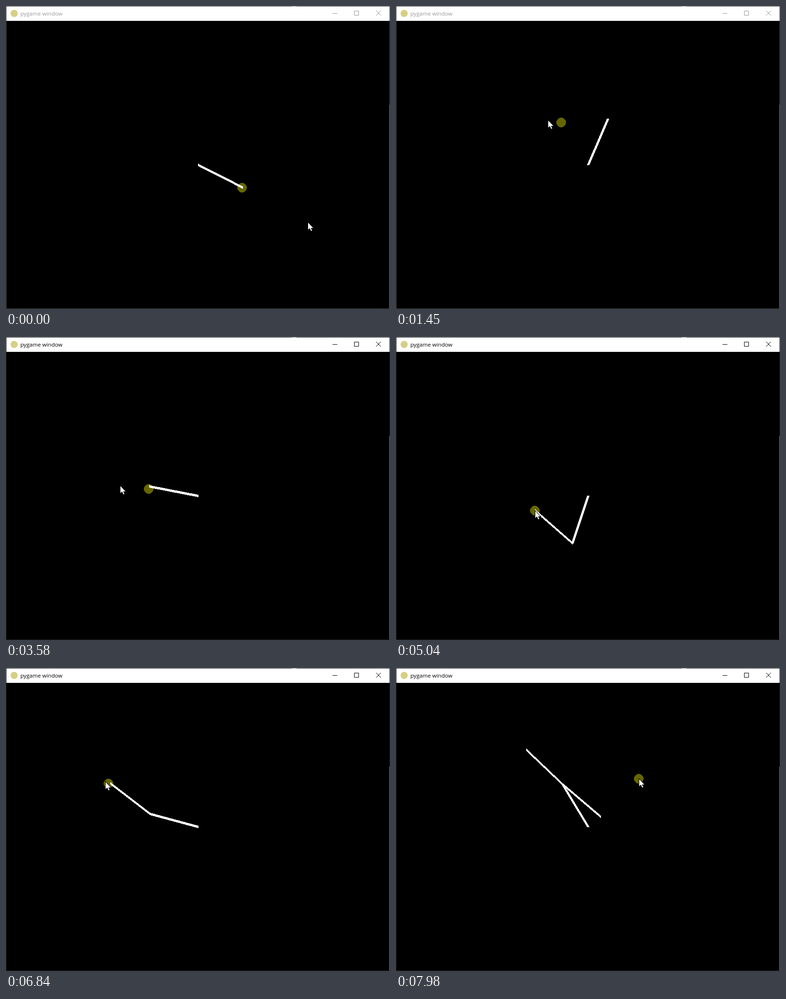
Write an HTML page that moves like this. It is 802 px wide and 632 px high and loops after 8000 ms.

```html
<!DOCTYPE html>
<html lang="en">
<head>
<meta charset="utf-8">
<title>Arm following the pointer</title>
<style>
  html, body { margin: 0; width: 100%; height: 100%; overflow: hidden; background: #000; }
  svg { display: block; width: 802px; height: 632px; color: #999; --edge: #484848; }
  svg.active { color: #000; --edge: #222; }
  .edge { fill: var(--edge); }
  .title { font: 11.6px "Open Sans", "Noto Sans", sans-serif; fill: currentColor; }
  .buttons { fill: none; stroke: currentColor; }
  .crisp { shape-rendering: crispEdges; }
</style>
</head>
<body>
<svg id="stage" viewBox="0 0 802 632">
  <rect class="edge" width="802" height="632"/>
  <rect x="597" width="10" height="1" fill="#888"/>
  <rect x="801" y="206" width="1" height="425" fill="#999"/>
  <rect x="1" y="1" width="800" height="30" fill="#fff"/>
  <rect x="1" y="31" width="800" height="600"/>
  <circle cx="17" cy="15.5" r="7.5" fill="#d6cf86"/>
  <text class="title" x="30" y="20">pygame window</text>
  <g class="buttons">
    <path d="M682 15.5H692M727.5 10.5h9v9h-9z"/>
    <path d="M773 10l10 10M783 10l-10 10"/>
  </g>
  <circle id="goal" class="crisp" r="10" fill="#666600"/>
  <path id="arm" class="crisp" fill="#fff"/>
  <path id="pointer" d="M0 0V14.5L3.5 11.3L6 17H8.3L5.8 11H10.5Z"
        fill="#fff" stroke="#000" stroke-width="2" paint-order="stroke"/>
</svg>
<script>
const LOOP = 8000, STEP = 200 / 3, LENGTH = 104, BASE = { x: 401, y: 331 };
const FOCUS_AT = 3050, SECOND_AT = 3690, LAST_AT = 7640, GOAL_LAG = 30;
const CHASE = .26, FOLLOW = .4;
const RAD = Math.PI / 180;

// Key points of the pointer: time, x, y
const mouse = [
  [400, 630, 451], [850, 568, 362], [1250, 478, 235], [1450, 317, 238],
  [1550, 292, 243], [1850, 281, 247], [2670, 281, 247], [3320, 233, 305],
  [3520, 233, 305], [4180, 290, 362], [5060, 290, 362], [5350, 360, 290],
  [5770, 341, 276], [6650, 211, 242], [7500, 192, 220], [7600, 192, 221],
  [7950, 507, 231]
];
// Headings the first two links swing to once the chain is doubled
const SWING = [112, 132];

function mouseAt(t) {
  const i = mouse.findIndex(key => key[0] > t);
  const b = mouse.at(i), a = i > 0 ? mouse[i - 1] : b;
  const k = a === b ? 0 : (t - a[0]) / (b[0] - a[0]);
  return { x: a[1] + (b[1] - a[1]) * k, y: a[2] + (b[2] - a[2]) * k };
}

const countAt = t => t < SECOND_AT ? 1 : t < LAST_AT ? 2 : 4;

// The goal stays within reach of the stretched arm
function goalAt(t) {
  const m = mouseAt(t - GOAL_LAG), dx = m.x - BASE.x, dy = m.y - BASE.y;
  const k = Math.min(1, LENGTH * countAt(t) / Math.hypot(dx, dy));
  return { x: BASE.x + dx * k, y: BASE.y + dy * k };
}

// Headings in degrees that bring one or two links to the goal
function solve(goal, count) {
  const dx = goal.x - BASE.x, dy = BASE.y - goal.y;
  const heading = Math.atan2(dy, dx) / RAD;
  const share = Math.min(1, Math.hypot(dx, dy) / LENGTH / count);
  const bend = count > 1 ? Math.acos(share) / RAD : 0;
  return [heading + bend, heading - bend];
}

function turn(from, to, rate) {
  const gap = ((to - from + 180) % 360 + 360) % 360 - 180;
  return from + gap * rate;
}

function simulate() {
  const frames = [];
  let pose = [-26.6];
  for (let t = 50 - STEP; t < LOOP + STEP; t += STEP) {
    const count = countAt(t), goal = goalAt(t);
    if (pose.length < count) {
      // New links start folded back over the arm
      const folded = pose.at(-1) - 180;
      while (pose.length < count) pose.push(folded);
    } else {
      const aims = count > 2 ? SWING : solve(goal, count);
      pose = pose.map((h, i) => i < 2 ? turn(h, aims[i], CHASE) : h);
      if (count > 2) {
        pose[2] = pose[1] - 180;
        pose[3] = turn(pose[3], pose[2], FOLLOW);
      }
    }
    frames.push({ t, goal, pose: [...pose], mouse: mouseAt(t) });
  }
  return frames;
}

// Thick line whose ends are cut along an axis, always wound the same way
function bar(x, y, dx, dy) {
  const flat = Math.abs(dx) > Math.abs(dy);
  const w = flat ? 0 : -2.5 * Math.sign(dy), h = flat ? 2.5 * Math.sign(dx) : 0;
  const cap = .5 / Math.max(Math.abs(dx), Math.abs(dy)), grow = 1 + 2 * cap;
  return `M${x - dx * cap - w} ${y - dy * cap - h}l${dx * grow} ${dy * grow}` +
    `l${2 * w} ${2 * h}l${-dx * grow} ${-dy * grow}z`;
}

function armPath(pose) {
  let x = BASE.x + .5, y = BASE.y + .5, d = "";
  for (const heading of pose) {
    const dx = LENGTH * Math.cos(heading * RAD), dy = -LENGTH * Math.sin(heading * RAD);
    d += bar(x, y, dx, dy);
    x += dx;
    y += dy;
  }
  return d;
}

const [stage, goal, arm, pointer] =
  ["stage", "goal", "arm", "pointer"].map(id => document.getElementById(id));
const frames = simulate();

function draw(now) {
  const frame = frames[Math.floor((now % LOOP - 39) / STEP) + 1];
  stage.classList.toggle("active", frame.t >= FOCUS_AT);
  goal.setAttribute("cx", Math.round(frame.goal.x));
  goal.setAttribute("cy", Math.round(frame.goal.y));
  arm.setAttribute("d", armPath(frame.pose));
  const { x, y } = frame.mouse;
  pointer.setAttribute("transform", `translate(${Math.round(x) + 1} ${Math.round(y) + 1})`);
}

const start = performance.now();
function tick() {
  draw(performance.now() - start);
  requestAnimationFrame(tick);
}
tick();
</script>
</body>
</html>
```
